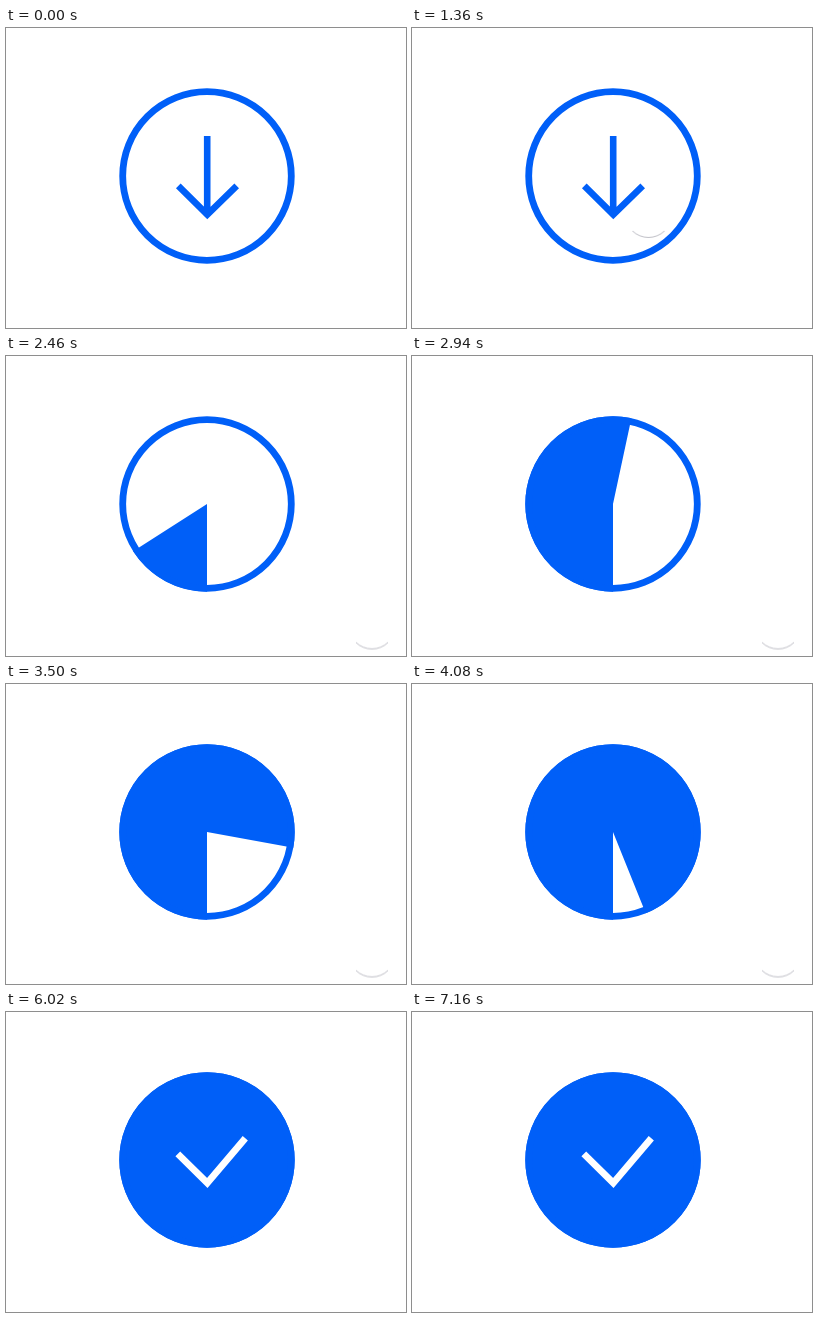
Recreate the animation shown at these times as an HTML page. Size 400x300 px, loop 7260 ms.

```html
<!DOCTYPE html>
<html lang="en">
<head>
<meta charset="utf-8">
<title>Download button</title>
<style>
  html, body { margin: 0; width: 100%; height: 100%; overflow: hidden; background: #fff; }
  svg { display: block; width: 400px; height: 300px; --blue: #005ff8; }
  svg * { fill: none; }
  .ring, .arrow, .pie { stroke: var(--blue); }
  .ring { stroke-width: 6.8; }
  .arrow { stroke-width: 6.6; animation: drop 7260ms infinite; }
  .pie { stroke-width: 87.7; stroke-dasharray: 360 360; animation: fill 7260ms infinite; }
  .check { stroke: #fff; stroke-width: 6.8; stroke-dasharray: 1 2; animation: tick 7260ms infinite; }
  .pointer { stroke: #667; stroke-width: .7; opacity: .6; animation: travel 7260ms infinite; }

  @keyframes drop {
    0%, 22.31% { transform: none; animation-timing-function: ease-in; }
    28.93%, 100% { transform: translateY(125px); }
  }
  /* progress runs clockwise from the bottom, slowing near the end */
  @keyframes fill {
    0%, 28.93% { stroke-dashoffset: 360; animation-timing-function: cubic-bezier(.33, .17, .67, .5); }
    33.88% { stroke-dashoffset: 303; animation-timing-function: cubic-bezier(.33, .28, .67, .76); }
    40.5% { stroke-dashoffset: 168; animation-timing-function: cubic-bezier(.33, .51, .67, .79); }
    56.2% { stroke-dashoffset: 22; animation-timing-function: cubic-bezier(.33, .48, .67, .9); }
    61.71%, 100% { stroke-dashoffset: 0; }
  }
  @keyframes tick {
    0%, 61.71% { stroke-dashoffset: 1.02; animation-timing-function: ease-out; }
    66.39%, 100% { stroke-dashoffset: 0; }
  }
  @keyframes travel {
    0%, 1.38% { transform: translate(371px, 310px); animation-timing-function: ease-in; }
    11.02% { transform: translate(356px, 295px); animation-timing-function: ease-out; }
    18.46%, 22.31% { transform: translate(236.5px, 209px); animation-timing-function: ease-in-out; }
    31.68%, 74.38% { transform: translate(366px, 292.5px); animation-timing-function: ease-in; }
    82.64%, 100% { transform: translate(430px, 294px); }
  }
</style>
</head>
<body>
<svg viewBox="0 0 400 300">
  <clipPath id="inside"><circle cx="201" cy="148" r="84"/></clipPath>
  <g clip-path="url(#inside)">
    <path class="arrow" d="M201.2 108V187M172.3 157.8L201.3 186.6L230.7 157.8"/>
  </g>
  <circle class="pie" cx="201" cy="148" r="43.85" pathLength="360" transform="rotate(90 201 148)"/>
  <circle class="ring" cx="201" cy="148" r="84.3"/>
  <path class="check" pathLength="1" d="M171.8 141.8L201.3 170.9L239.3 126.3"/>
  <path class="pointer" d="M-16 -6A23 23 0 0 0 16 -6"/>
</svg>
</body>
</html>
```
